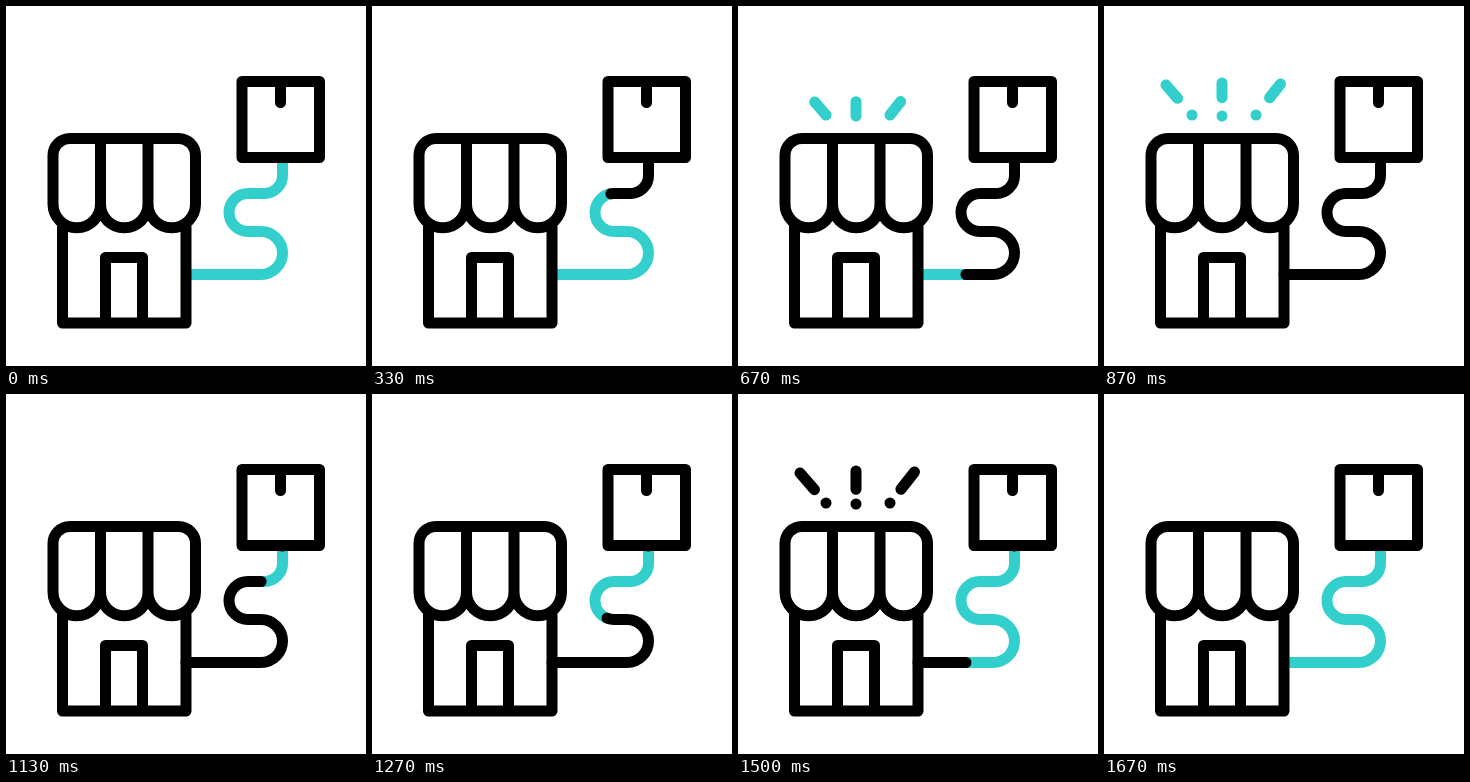
Animation, 360 px wide and 360 px high, one loop 1.7 s. Source, as an HTML page:

```html
<!DOCTYPE html>
<html lang="en">
<head>
<meta charset="utf-8">
<title>Shop delivery</title>
<style>
  html, body { margin: 0; width: 100%; height: 100%; overflow: hidden; background: #fff; }
  svg { display: block; width: 100vw; height: 100vh; }
  g { fill: none; stroke-width: 11; stroke-linejoin: round; }
  .teal { stroke: #33cfcd; }
  .ink { stroke: #000; stroke-linecap: round; }
</style>
</head>
<body>
<svg viewBox="0 0 360 360">
  <defs>
    <path id="route" d="M276.5 152V169.500A18 18 0 0 1 258.500 187.500H242A19 19 0 0 0 242 225.500H255A21.500 21.500 0 0 1 255 268.500H180"/>
  </defs>
  <g id="lines"></g>
  <g id="sparks" stroke-linecap="round"></g>
  <g class="ink">
    <path d="M236 75.500H313.500V151.500H236ZM274.500 76V96.500"/>
    <path d="M56.500 221V317H180V221M99.500 317V251.500H136.500V317"/>
    <path d="M47 198V149.500A17 17 0 0 1 64 132.500H172.500A17 17 0 0 1 189.500 149.500V198A23.750 23.750 0 0 1 142 198A23.750 23.750 0 0 1 94.500 198A23.750 23.750 0 0 1 47 198M94.500 133V198M142 133V198"/>
  </g>
</svg>
<script>
const NS = 'http://www.w3.org/2000/svg';
const LOOP = 1700, STEP = 33.4, LEAD = 7;
const TEAL = '#33cfcd';

function addPath(parent, d, cls) {
  const el = document.createElementNS(NS, 'path');
  el.setAttribute('d', d);
  if (cls) el.setAttribute('class', cls);
  document.getElementById(parent).append(el);
  return { el, len: el.getTotalLength() };
}

const routeD = document.getElementById('route').getAttribute('d');
const tealLine = addPath('lines', routeD, 'teal');
const inkLine = addPath('lines', routeD, 'ink');
const sparks = ['M88 109L62 79', 'M118 110V77', 'M152 109L176.500 78']
  .map(d => addPath('sparks', d));

// Share of a linear move that begins at `start` and takes `dur` ticks
const ramp = (tick, start, dur) => Math.min(1, Math.max(0, (tick - start) / dur));

// Show only the part of a path between the shares a and b
function trim({ el, len }, a, b) {
  el.style.display = b > a ? '' : 'none';
  el.setAttribute('stroke-dasharray', `0 ${a * len} ${(b - a) * len} ${len * 2}`);
}

function draw(ms) {
  const tick = Math.floor((ms % LOOP + LEAD) / STEP);

  const head = ramp(tick, 6, 17);
  const tail = ramp(tick, 31, 17);
  trim(inkLine, tail, head);
  if (tail > 0) trim(tealLine, 0, tail);
  else trim(tealLine, head, 1);

  // Teal burst first, then the same burst in black 20 ticks later
  const black = tick >= 34;
  const beat = black ? tick - 20 : tick;
  const tip = ramp(beat, 18, 4.6);
  const end = ramp(beat, 21, 9);
  for (const s of sparks) {
    s.el.setAttribute('stroke', black ? '#000' : TEAL);
    trim(s, end, tip);
  }
}

const t0 = performance.now();
function loop() {
  draw(performance.now() - t0);
  requestAnimationFrame(loop);
}
loop();
</script>
</body>
</html>
```
